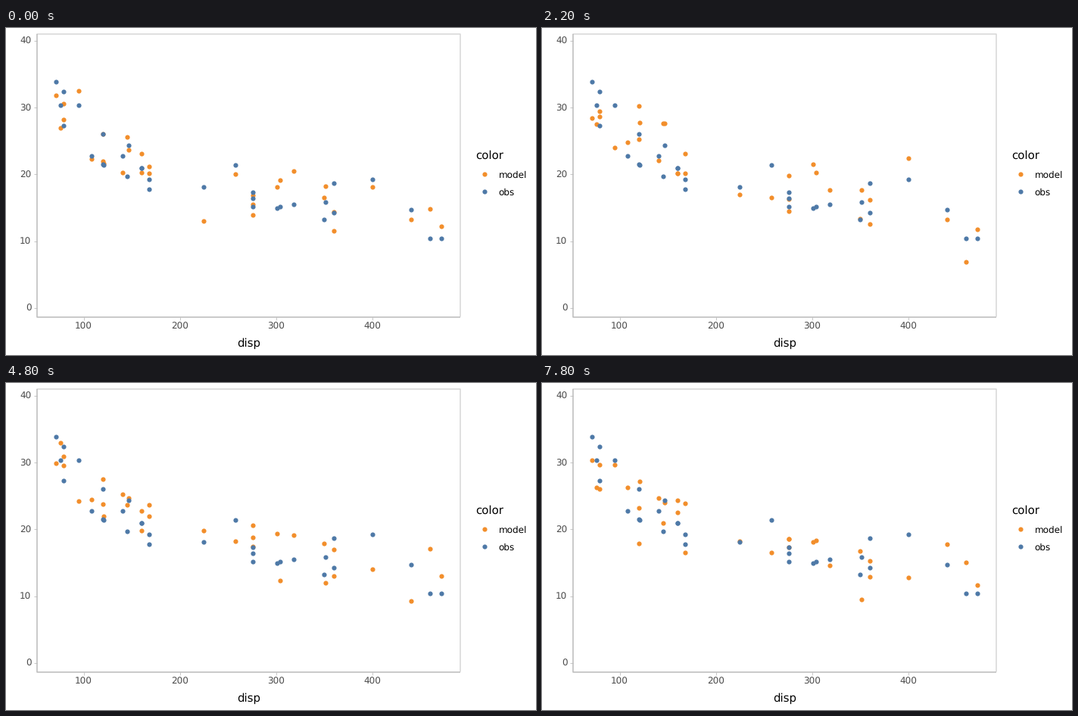
Animation of 700 by 432 pixels, one loop 8 s. Source, as a matplotlib script:

```python
import numpy as np
import matplotlib.pyplot as plt
from matplotlib.animation import FuncAnimation

W, H, DPI = 700, 432, 100
PX = 72 / DPI            # points per pixel
FRAMES, STEP = 40, 200
ORANGE, BLUE = "#f28e2b", "#4e79a7"
DOT = 6.2
SMALL, LARGE = 12, 15    # text sizes in pixels
NOISE = 2.7

plt.rcParams["text.hinting"] = "none"
plt.rcParams["font.family"] = "DejaVu Sans"

# Observed points, sorted by disp
DISP = np.array([
    71.1, 75.7, 78.7, 79, 95.1, 108, 120.1, 120.3, 121, 140.8, 145, 146.7,
    160, 160, 167.6, 167.6, 225, 258, 275.8, 275.8, 275.8, 301, 304, 318,
    350, 351, 360, 360, 400, 440, 460, 472])
OBS = np.array([
    33.9, 30.4, 32.4, 27.3, 30.4, 22.8, 21.5, 26, 21.4, 22.8, 19.7, 24.4,
    21, 21, 19.2, 17.8, 18.1, 21.4, 16.4, 17.3, 15.2, 15, 15.2, 15.5,
    13.3, 15.8, 18.7, 14.3, 19.2, 14.7, 10.4, 10.4])


def px(disp):
    return 102.6 + (disp - 100) * 1.2708


def py(value):
    return 369.9 - value * 8.826


def simulate(frame):
    """One fresh draw from the fitted log curve."""
    rng = np.random.default_rng(500 + frame)
    return 69 - 9.17 * np.log(DISP) + rng.normal(0, NOISE, DISP.size)


fig = plt.figure(figsize=(W / DPI, H / DPI), dpi=DPI, facecolor="white")
ax = fig.add_axes([0, 0, 1, 1])
ax.set_xlim(0, W)
ax.set_ylim(H, 0)
ax.axis("off")


def line(xs, ys, color, width, z=1, snap=None):
    ax.plot(xs, ys, color=color, lw=width * PX, zorder=z, snap=snap,
            solid_capstyle="butt")


def dots(xs, ys, color, z):
    return ax.scatter(xs, ys, s=(DOT * PX) ** 2, color=color,
                      linewidths=0, zorder=z)


def label(x, y, text, size, color="black", ha="left"):
    ax.text(x, y, text, fontsize=size * PX, color=color, ha=ha,
            va="baseline")


# Panel border, axis lines and ticks
L, T, R, B = 40.5, 8, 600, 381.5
line([L, R, R], [T, T, B], "#d4d4d4", 1.4, snap=False)
line([L, L, R], [T, B, B], "#b9b9b9", 1.5, 2)
for v in range(0, 41, 10):
    line([37, L], [py(v)] * 2, "#c8c8c8", 1)
    label(33.4, py(v) + 4.3, str(v), SMALL, "#4d4d4d", "right")
for v in range(100, 401, 100):
    line([px(v)] * 2, [B, 385.5], "#c8c8c8", 1)
    label(px(v), 397.5, str(v), SMALL, "#4d4d4d", "center")
label(321, 421, "disp", LARGE, ha="center")

# Legend
label(620.5, 173, "color", LARGE)
for y, name, color in ((193.4, "model", ORANGE), (216.4, "obs", BLUE)):
    dots([632.3], [y], color, 3)
    label(650.7, y + 4.2, name, SMALL)

model = dots(px(DISP), py(simulate(0)), ORANGE, 3)
dots(px(DISP), py(OBS), BLUE, 4)


def update(frame):
    model.set_offsets(np.column_stack([px(DISP), py(simulate(frame))]))
    return (model,)


anim = FuncAnimation(fig, update, frames=FRAMES, interval=STEP,
                     init_func=lambda: update(0), repeat=True, repeat_delay=0)
plt.show()
```
